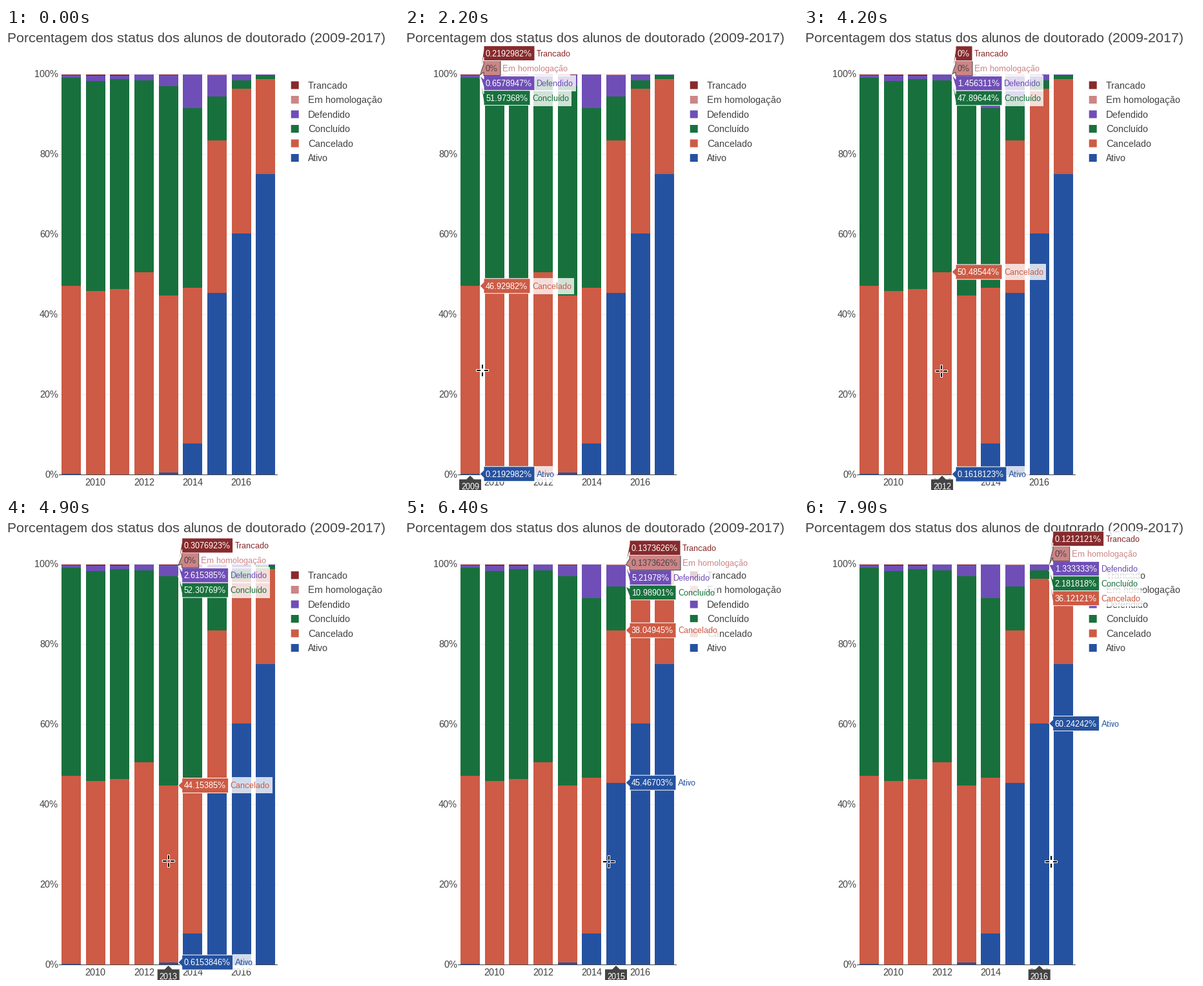
A matplotlib script for the animation above (8 s loop, 609 by 715 pixels).

```python
import matplotlib.pyplot as plt
import numpy as np
from matplotlib.animation import FuncAnimation
from matplotlib.patches import Polygon, Rectangle

W, H, DPI = 609, 715, 64
PT = 72 / DPI
STEP_MS, FRAMES = 100, 80

plt.rcParams.update({
    "font.family": "Liberation Sans",
    "text.hinting": "native",
    "text.hinting_factor": 1,
    "toolbar": "None",
})

INK = "#444444"
YEARS = np.arange(2009, 2018)

# Students per status and year, from the bottom of the stack to the top
STATUSES = {
    "Ativo": ("#2552a0", [1, 0, 0, 1, 4, 53, 331, 497, 601]),
    "Cancelado": ("#cd5b45", [214, 140, 286, 312, 287, 265, 277, 298, 190]),
    "Concluído": ("#18713d", [237, 160, 323, 296, 340, 305, 80, 18, 7]),
    "Defendido": ("#6f4eb7", [3, 4, 5, 9, 17, 57, 38, 11, 2]),
    "Em homologação": ("#cd8486", YEARS == 2015),
    "Trancado": ("#872a2c", [1, 1, 2, 0, 2, 1, 1, 1, 0]),
}
NAMES = list(STATUSES)
COLORS = [color for color, _ in STATUSES.values()]
COUNTS = np.array([counts for _, counts in STATUSES.values()], dtype=float).T
SHARES = 100 * COUNTS / COUNTS.sum(axis=1, keepdims=True)
TOTALS = SHARES.cumsum(axis=1)

X0, X_STEP, HALF_BAR = 101, 113 / 3, 15
Y0, Y_SCALE = 691.55, 6.2
ARROW, PAD, BOX_H = 6, 3, 23

fig = plt.figure(figsize=(W / DPI, H / DPI), dpi=DPI, facecolor="white")
ax = fig.add_axes([0, 0, 1, 1])
ax.set(xlim=(0, W), ylim=(H, 0))
ax.axis("off")
renderer = fig.canvas.get_renderer()


def center(i):
    return X0 + i * X_STEP


def y_of(percent):
    return Y0 - percent * Y_SCALE


def rect(x, y, w, h, color, z=1, **style):
    return ax.add_patch(Rectangle((x, y), w, h, fc=color, lw=0, zorder=z, **style))


def poly(points, fill, edge, z):
    return ax.add_patch(Polygon(points, fc=fill, ec=edge, lw=PT, joinstyle="miter", zorder=z))


def text(x, y, s, size, color=INK, ha="left", z=3):
    return ax.text(x, y, s, fontsize=size * PT, color=color, ha=ha, va="baseline", zorder=z)


def width(label):
    return label.get_window_extent(renderer).width + 1


def draw_bar(i):
    x = round(center(i) - HALF_BAR)
    base = round(Y0)
    for top, share, color in zip(TOTALS[i], SHARES[i], COLORS):
        y = round(y_of(top))
        if share:
            rect(x, y, 2 * HALF_BAR, base - y, color)
        base = y


def draw_chart():
    text(2, 22, "Porcentagem dos status dos alunos de doutorado (2009-2017)", 21)
    for pct in range(0, 101, 20):
        y = int(y_of(pct))
        rect(82, y, 339, 1, "#eeeeee" if pct else INK, 0 if pct else 2)
        text(81, y + 5, f"{pct}%", 15, ha="right")
    for i, year in enumerate(YEARS):
        draw_bar(i)
        if year % 2 == 0:
            text(center(i), 708, str(year), 15, ha="center")
    for k, name in enumerate(reversed(NAMES)):
        y = 88.5 + 22.5 * k
        rect(441.7, y - 6, 12, 12, STATUSES[name][0], snap=False)
        text(468, int(y + 5.5), name, 15)


def spread(wanted):
    """Stack labels that would overlap, each stack centred on its mean."""
    groups = []
    for y in wanted:
        groups.append([y])
        while len(groups) > 1:
            a, b = groups[-2:]
            if np.mean(b) - np.mean(a) >= BOX_H * (len(a) + len(b)) / 2:
                break
            groups[-2:] = [a + b]
    return [np.mean(g) + BOX_H * (k - (len(g) - 1) / 2)
            for g in groups for k in range(len(g))]


def value_label(tip_x, tip_y, y, share, k, z):
    name, color = NAMES[k], COLORS[k]
    contrast = INK if name == "Em homologação" else "white"
    left, top, bottom = tip_x + ARROW, y - BOX_H / 2, y + BOX_H / 2
    base = round(y + 4.5)
    value = text(left + PAD, base, f"{share:.7g}%", 13, contrast, z=z + 0.3)
    right = left + width(value) + 2 * PAD
    title = text(right + PAD, base, name, 13, color, z=z + 0.3)
    back = rect(right, top - 1, width(title) + 2 * PAD, BOX_H + 2, "white", z, alpha=0.8)
    box = poly([(tip_x, tip_y), (left, y + ARROW), (left, bottom), (right, bottom),
                (right, top), (left, top), (left, y - ARROW)], color, contrast, z + 0.1)
    return [value, title, back, box]


def year_label(i):
    x, y = center(i), 692
    label = text(x, 714, str(YEARS[i]), 13, "white", "center", 5.5)
    half = width(label) / 2 + PAD
    top, bottom = y + ARROW, y + ARROW + BOX_H
    box = poly([(x, y), (x + ARROW, top), (x + half, top), (x + half, bottom),
                (x - half, bottom), (x - half, top), (x - ARROW, top)], INK, "white", 5)
    return [label, box]


def hover(i):
    tips = [y_of(t) for t in TOTALS[i]]
    places = spread(tips[::-1])[::-1]
    parts = year_label(i)
    for k, (tip, place) in enumerate(zip(tips, places)):
        parts += value_label(center(i) + HALF_BAR, tip, place, SHARES[i, k], k, 6 + k)
    return parts


def make_cursor():
    """Four arms around an open centre, each black on a white rim."""
    parts = []
    for rim, color, z in ((1, "white", 20), (0, "black", 21)):
        for dx, dy in ((1, 0), (-1, 0), (0, 1), (0, -1)):
            w = 2 + 4 * abs(dx) + 2 * rim
            h = 2 + 4 * abs(dy) + 2 * rim
            parts.append((rect(0, 0, w, h, color, z), 6 * dx - w / 2, 6 * dy - h / 2))
    return parts


# Key points of the pointer's walk to the right: time, x
WALK = [(1300, 3), (2200, 120), (2400, 129), (2700, 129), (3300, 168),
        (4200, 213), (5300, 275), (6400, 316), (7900, 383)]


def pointer(t):
    start, end = WALK[0][0], WALK[-1][0]
    x = np.interp(t, *zip(*WALK))
    y = 529.5 + 3 * (t - start) / (end - start)
    return x, y


def hovered(x):
    """Index of the last bar whose left edge the pointer has passed."""
    return int((x - X0 + HALF_BAR - 0.5) // X_STEP)


draw_chart()
hovers = [hover(i) for i in range(hovered(WALK[-1][1]) + 1)]
cursor = make_cursor()


def update(frame):
    t = frame * STEP_MS
    x, y = pointer(t)
    active = hovered(x)
    for i, parts in enumerate(hovers):
        for part in parts:
            part.set_visible(i == active)
    for part, dx, dy in cursor:
        part.set_visible(t >= WALK[0][0])
        part.set_xy((round(x) + dx, round(y) + dy))
    return []


anim = FuncAnimation(fig, update, frames=FRAMES, interval=STEP_MS,
                     repeat=True, repeat_delay=0, blit=False)
plt.show()
```
